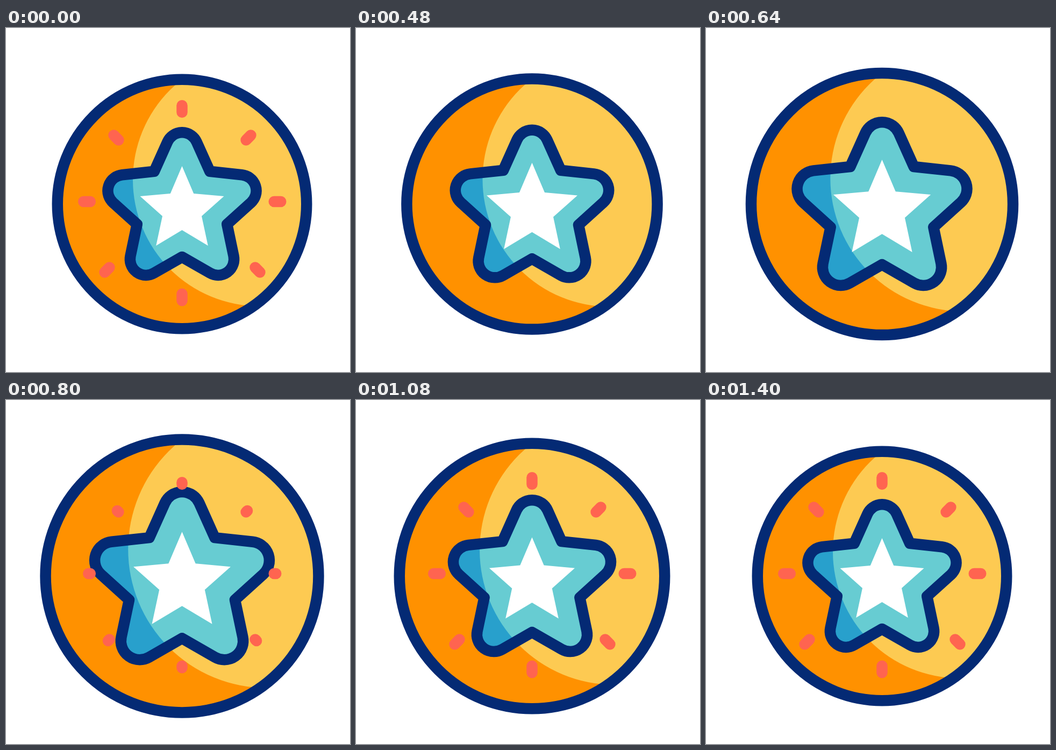
An HTML page with a canvas for the animation above (1.44 s loop, 640 px wide and 640 px high).

```html
<!DOCTYPE html>
<html lang="en">
<head>
<meta charset="utf-8">
<title>Star coin</title>
<style>
  html, body { margin: 0; width: 100%; height: 100%; overflow: hidden; background: #fff; }
  canvas { display: block; width: 640px; height: 640px; }
</style>
</head>
<body>
<canvas id="stage" width="640" height="640"></canvas>
<script>
const ctx = document.getElementById('stage').getContext('2d');
const LOOP = 1440;
const CENTER = 327.5;
const LINE = 20.5;
const COIN_RADIUS = 231.75;
const NAVY = '#042a74', ORANGE = '#ff9100', YELLOW = '#fdca52';
const TEAL = '#67ccd2', BLUE = '#28a0cc', RED = '#ff6450';

// Ray centre, outward direction, and whether it sits on the lit side.
const RAYS = [
  [327.5, 150.5, 0, -1, true], [451, 204, 1, -1, true],
  [505, 323, 1, 0, true], [468, 450, 1, 1, true],
  [327.5, 501, 0, 1, false], [188, 450, -1, 1, false],
  [150.5, 323, -1, 0, false], [205, 204, -1, -1, false]
];
const RAY_HALF = 6.25;

const clamp = x => Math.min(1, Math.max(0, x));
const ramp = (t, from, to) => clamp((t - from) / (to - from));

// Cubic bezier (.42, 0, .58, 1), solved by bisection.
function ease(x) {
  if (x <= 0 || x >= 1) return clamp(x);
  let low = 0, high = 1;
  for (let i = 0; i < 24; i++) {
    const u = (low + high) / 2, v = 1 - u;
    if (1.26 * v * v * u + 1.74 * v * u * u + u * u * u < x) low = u;
    else high = u;
  }
  return low * low * (3 - 2 * low);
}

const easeRamp = (t, from, to) => ease(ramp(t, from, to));
const pulse = (t, a, b, c, d) => easeRamp(t, a, b) - easeRamp(t, c, d);

function circle(x, y, r) {
  const path = new Path2D();
  path.arc(x, y, r, 0, Math.PI * 2);
  return path;
}

function roundedStar(scale) {
  const path = new Path2D();
  const point = (step, radius) => {
    const angle = step * Math.PI / 5;
    return [
      CENTER + scale * radius * Math.sin(angle),
      CENTER + scale * (10.5 - radius * Math.cos(angle))
    ];
  };
  path.moveTo(...point(-1, 88));
  for (let i = 0; i < 10; i += 2) {
    path.arcTo(...point(i, 186.5), ...point(i + 1, 88), 29.7 * scale);
    path.lineTo(...point(i + 1, 88));
  }
  path.closePath();
  return path;
}

function sharpStar(scale) {
  const half = [[0, -74], [21.7, -23], [78, -18], [36.5, 19], [48.3, 74], [0, 45]];
  const mirrored = half.slice(1, 5).reverse().map(([x, y]) => [-x, y]);
  const path = new Path2D();
  for (const [x, y] of half.concat(mirrored)) {
    path.lineTo(CENTER + x * scale, 331 + y * scale);
  }
  path.closePath();
  return path;
}

// A base colour with the lit circle laid over it, inside an outlined shape.
function shadedShape(shape, light, dark, lit) {
  ctx.save();
  ctx.clip(shape);
  ctx.fillStyle = dark;
  ctx.fill(shape);
  ctx.fillStyle = lit;
  ctx.fill(light);
  ctx.restore();
  ctx.strokeStyle = NAVY;
  ctx.lineWidth = LINE;
  ctx.stroke(shape);
}

function drawRays(t) {
  const leaving = t < 560;
  const trim = leaving ? easeRamp(t, 0, 480) : easeRamp(t, 640, 1080);
  const start = leaving ? -RAY_HALF + 2 * RAY_HALF * trim : -RAY_HALF;
  const end = leaving ? RAY_HALF : -RAY_HALF + 2 * RAY_HALF * trim;

  ctx.strokeStyle = RED;
  ctx.lineWidth = LINE;
  for (const [x, y, dx, dy, onLight] of RAYS) {
    const length = Math.hypot(dx, dy);
    const ux = dx / length, uy = dy / length;
    const fadeOut = onLight ? ramp(t, 220, 320) : ramp(t, 240, 400);
    ctx.globalAlpha = leaving ? 1 - fadeOut : ramp(t, 650, 740);
    if (!ctx.globalAlpha) continue;
    ctx.beginPath();
    ctx.moveTo(x + ux * start, y + uy * start);
    ctx.lineTo(x + ux * end + ux * 0.01, y + uy * end + uy * 0.01);
    ctx.stroke();
  }
  ctx.globalAlpha = 1;
}

function draw(t) {
  const coinRadius = COIN_RADIUS + 23.5 * pulse(t, 400, 880, 880, 1360);
  const coinScale = coinRadius / COIN_RADIUS;
  const starScale = 1 + 0.177 * pulse(t, 360, 760, 780, 1290);
  const whiteScale = 1 + 0.165 * pulse(t, 280, 680, 740, 1190);
  const light = circle(CENTER + 144 * coinScale, CENTER - 45.5 * coinScale, 235.5 * coinScale);

  ctx.fillStyle = '#fff';
  ctx.fillRect(0, 0, 640, 640);
  ctx.lineCap = ctx.lineJoin = 'round';
  shadedShape(circle(CENTER, CENTER, coinRadius), light, ORANGE, YELLOW);
  shadedShape(roundedStar(starScale), light, BLUE, TEAL);
  ctx.fillStyle = '#fff';
  ctx.fill(sharpStar(whiteScale));
  drawRays(t);
}

const begin = performance.now();
function tick() {
  draw((performance.now() - begin) % LOOP);
  requestAnimationFrame(tick);
}
tick();
</script>
</body>
</html>
```
